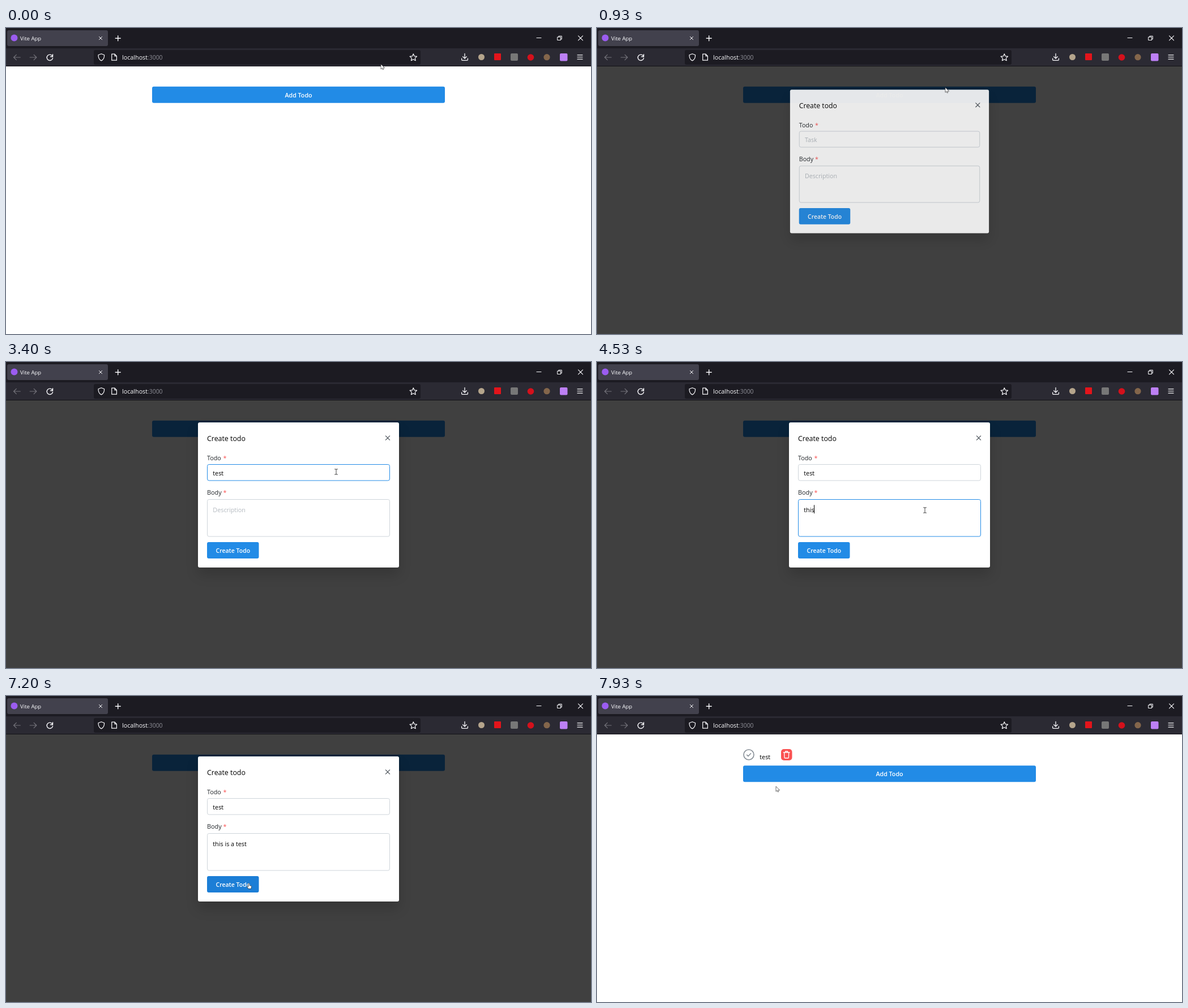
Write an HTML page with a canvas that moves like this. It is 1033x542 px and loops after 8000 ms.

```html
<!DOCTYPE html>
<html lang="en">
<head>
<meta charset="utf-8">
<title>Todo demo</title>
<style>
html, body { margin: 0; width: 100%; height: 100%; overflow: hidden; background: #fff; }
canvas { display: block; }
</style>
</head>
<body>
<canvas id="stage" width="1033" height="542"></canvas>
<script>
const W = 1033, H = 542, LOOP = 8000, STEP = 8000 / 120;
const FONT = '"Open Sans", "Noto Sans", sans-serif';
const BLUE = '#228be6', HOVER = '#1c7ed6', RED = '#fa5252';
const OPEN = 777, CLOSE = 7290, SUBMIT = 7130;
const main = document.getElementById('stage').getContext('2d');
const layer = document.createElement('canvas');
layer.width = W; layer.height = H;
const modalCtx = layer.getContext('2d');
let c = main;

const clamp = x => Math.max(0, Math.min(1, x));
const mix = (a, b, p) => a + (b - a) * p;
const mixColor = (a, b, p) => `rgb(${a.map((v, i) => Math.round(mix(v, b[i], p)))})`;

// CSS "ease": cubic-bezier(.25, .1, .25, 1)
function ease(x) {
  x = clamp(x);
  const bez = (a, b, s) => 3 * a * s * (1 - s) ** 2 + 3 * b * s * s * (1 - s) + s ** 3;
  let lo = 0, hi = 1;
  for (let i = 0; i < 20; i++) {
    const mid = (lo + hi) / 2;
    if (bez(.25, .25, mid) < x) lo = mid; else hi = mid;
  }
  return bez(.1, 1, lo);
}

function rect(x, y, w, h, fill, r = 0, stroke) {
  c.beginPath();
  c.roundRect(x, y, w, h, r);
  if (fill) { c.fillStyle = fill; c.fill(); }
  if (stroke) { c.strokeStyle = stroke; c.lineWidth = 1; c.stroke(); }
}

function dot(x, y, r, fill) {
  c.beginPath();
  c.arc(x, y, r, 0, 7);
  c.fillStyle = fill;
  c.fill();
}

function line(d, color, width = 1.2, x = 0, y = 0, fill) {
  c.save();
  c.translate(x, y);
  c.lineCap = c.lineJoin = 'round';
  const path = new Path2D(d);
  if (fill) { c.fillStyle = fill; c.fill(path); }
  c.strokeStyle = color;
  c.lineWidth = width;
  c.stroke(path);
  c.restore();
}

function text(str, x, y, size, color, weight = 400, align = 'left') {
  c.font = `${weight} ${size}px ${FONT}`;
  c.textAlign = align;
  c.fillStyle = color;
  c.fillText(str, x, y);
}

function cross(x, y, r, color, width) {
  line(`M${-r} ${-r}L${r} ${r}M${r} ${-r}L${-r} ${r}`, color, width, x, y);
}

function drawBrowser() {
  const ink = '#fbfbfe', dim = '#74737b';
  rect(0, 0, W, 36, '#1c1b22');
  rect(0, 36, W, 32, '#2b2a33');
  rect(0, 67, W, 1, '#121116');
  rect(2, 4, 178, 28, '#42414d', 3);
  dot(14.5, 17.5, 6, '#9b5cf0');
  text('Vite App', 25, 21.7, 9.6, ink);
  cross(167, 18, 2.6, ink, 1);
  line('M-4.5 0H4.5M0-4.5V4.5', ink, 1.4, 197.7, 18.3);
  line('M937 17.5H945', ink, 1);
  line('M974 16h5.5v5.5h-5.5zM975.8 16v-1.7h5.5v5.5h-1.7', ink, 1);
  cross(1014.5, 17.8, 4, ink, 1.1);

  line('M6 0H-5.5M-1-4.7L-5.7 0L-1 4.7', dim, 1.2, 19.3, 52);
  line('M-6 0H5.5M1-4.7L5.7 0L1 4.7', dim, 1.2, 48.2, 52);
  line('M4.6-2.6A5.2 5.2 0 1 0 5.2 1M5.2-5.5V-1.6H1.3', ink, 1.4, 77.3, 52.3);

  rect(155, 39, 577, 26, '#1c1b22', 3);
  line('M0-6L5.3-4C5.5 1 3.5 4.4 0 6.2C-3.5 4.4-5.5 1-5.3-4Z', ink, 1.2, 168.3, 51.7);
  line('M-4.3-5.5H1L4.4-2V5.5H-4.3ZM1-5.5V-2H4.4', ink, 1.2, 191, 51.7);
  text('localhost', 205, 56, 10.75, ink);
  text(':3000', 250, 56, 10.4, '#8f8f98');
  let star = 'M';
  for (let i = 0; i < 10; i++) {
    const a = i * Math.PI / 5, r = i % 2 ? 3.1 : 6.6;
    star += `${i ? 'L' : ''}${(r * Math.sin(a)).toFixed(2)} ${(-r * Math.cos(a)).toFixed(2)}`;
  }
  line(star + 'Z', ink, 1.2, 719.3, 52.4);

  line('M0-6V2.5M-3.3-.7L0 2.6L3.3-.7M-5.4 2.5V4.4Q-5.4 5.8-4 5.8H4Q5.4 5.8 5.4 4.4V2.5', ink, 1.3, 810, 51.5);
  dot(839.5, 51.5, 5.5, '#b5a58c');
  rect(862, 45, 12, 12, '#e3141b', 1);
  rect(891, 45, 13, 13, '#777', 2);
  dot(926.5, 52, 5.8, '#d4111c');
  dot(955, 51.7, 5.6, '#84664b');
  rect(978, 45, 13.5, 13.5, '#bd80f5', 2);
  line('M1009 47.8H1018M1009 51.5H1018M1009 55.2H1018', ink, 1.2);
}

function drawPage(t, hovered) {
  const added = t >= CLOSE;
  rect(0, 68, W, H - 68, '#fff');
  if (added) {
    c.beginPath();
    c.arc(268, 104, 9, 0, 7);
    c.strokeStyle = '#868e96';
    c.lineWidth = 1.6;
    c.stroke();
    line('M-3.4.2L-1 2.6L3.6-2.2', '#868e96', 1.5, 268, 104);
    text('test', 287.3, 112, 10.8, '#000');
    rect(325, 94, 19.5, 20, RED, 5);
    line('M-5.5-4H5.5M-2-4V-6H2V-4M-4-4L-3.7 5Q-3.6 6-2.6 6H2.6Q3.6 6 3.7 5L4-4', '#fff', 1.3, 334.7, 104);
  }
  const y = added ? 123.2 : 103.8 + (t >= 670 && t < 730 ? .8 : 0);
  rect(258, y, 517, 29, hovered ? HOVER : BLUE, 3);
  text('Add Todo', 516.5, y + 19.2, 10.7, '#fff', 600, 'center');
}

const TASK = 'test', TASK_KEYS = [2470, 2530, 2670, 2730];
const BODY = 'this is a test';
const BODY_KEYS = [4270, 4330, 4470, 4530, 4670, 4730, 4800, 4930, 5000, 5070, 5330, 5470, 5670, 5730];
const typed = (str, keys, t) => str.slice(0, keys.filter(k => k <= t).length);

// Focus strength of a field whose border colour takes about 100 ms to change
function focus(t, from, to) {
  return ease((t - from + 40) / 100) * (1 - ease((t - to + 40) / 100));
}

function drawField(y, h, base, value, hint, strength, caret) {
  const border = mixColor([206, 212, 218], [34, 139, 230], strength);
  rect(355.5, y + .5, 322, h - 1, '#fff', 3, border);
  text(value || hint, 365.3, base, 10.8, value ? '#000' : '#b4bac0');
  if (caret) {
    const x = 365 + Math.round(value ? c.measureText(value).width : 0);
    rect(x, base - 12.5, 1, 15, '#000');
  }
}

function drawLabel(str, y) {
  text(str, 355, y, 10.8, '#212529');
  text('*', 383.5, y, 10.8, RED);
}

function drawModal(t, p, hovered) {
  c = modalCtx;
  c.clearRect(0, 0, W, H);
  c.save();
  const scale = mix(.9, 1, p);
  c.translate(516.5, 235.5);
  c.scale(scale, scale);
  c.translate(-516.5, -235.5 + 8 * (1 - p));

  c.save();
  c.shadowColor = 'rgba(0,0,0,.16)';
  c.shadowBlur = 22;
  c.shadowOffsetY = 13;
  rect(339, 107, 355, 257, '#fff', 3);
  c.restore();

  text('Create todo', 355, 139.7, 12.4, '#000');
  cross(674, 134.5, 3.6, '#495057', 1.2);
  drawLabel('Todo', 174);
  drawLabel('Body', 235);
  const taskCaret = t >= 2200 && t < 3930 && !(t >= 3270 && t < 3800);
  const bodyCaret = t >= 3930 && t < SUBMIT && !(t >= 6070 && t < 6570);
  drawField(181, 29.5, 200.5, typed(TASK, TASK_KEYS, t), 'Task', focus(t, 2200, 3930), taskCaret);
  drawField(243, 66.5, 265.7, typed(BODY, BODY_KEYS, t), 'Description', focus(t, 3930, SUBMIT), bodyCaret);
  const y = 319 + (t === SUBMIT ? .8 : 0);
  rect(355, y, 91.5, 29, hovered ? HOVER : BLUE, 3);
  text('Create Todo', 400.8, y + 19.2, 10.5, '#fff', 600, 'center');
  c.restore();

  c = main;
  c.globalAlpha = p;
  c.drawImage(layer, 0, 0);
  c.globalAlpha = 1;
}

// Each move: start, end, target x, target y
const MOVES = [
  [30, 470, 615, 105.5],
  [1490, 1930, 583, 194.5],
  [3440, 3870, 579, 262.5],
  [6410, 6930, 428.7, 331.5],
  [7400, 7930, 316, 160.5]
];

function pointer(t) {
  let x = 662, y = 64.3;
  for (const [from, to, tx, ty] of MOVES) {
    const u = clamp((t - from) / (to - from)), p = u * u * (3 - 2 * u);
    x = mix(x, tx, p);
    y = mix(y, ty, p);
  }
  return [x, y];
}

const inside = (x, y, l, t, r, b) => x >= l && x <= r && y >= t && y <= b;

function drawPointer(kind, x, y) {
  if (kind === 'text') {
    line('M-2.5-4.7H-.6Q0-4.7 0-4Q0-4.7.6-4.7H2.5M0-4V4M-2.5 4.7H-.6Q0 4.7 0 4Q0 4.7.6 4.7H2.5', '#333', .9, x, y);
  } else if (kind === 'hand') {
    line('M-1 .8Q0-.6 1 .8V4L4.2 4.8Q5 5.2 4.8 6.2L4 10H-.4L-3 6.6Q-3.3 5.3-2 5.5L-1 6.4Z', '#222', .7, x, y, '#fff');
  } else {
    line('M0 0V8.6L2-0.1L2 6.9L3.4 9.6L4.7 9L3.5 6.4H6.3Z'.replace('L2-0.1', ''), '#333', .7, x, y, '#fff');
  }
}

function render(t) {
  const opened = t >= OPEN && t < CLOSE;
  const [x, y] = pointer(t);
  const addTop = t >= CLOSE ? 123 : 104;
  const onAdd = !opened && inside(x, y, 258, addTop, 775, addTop + 29);
  const onCreate = opened && inside(x, y, 355, 319, 446, 348);
  const onField = opened && (inside(x, y, 355, 181, 678, 210) || inside(x, y, 355, 243, 678, 309));

  drawBrowser();
  drawPage(t, onAdd);
  const shade = ease((t - OPEN) / 150) * (1 - ease((t - CLOSE) / 150));
  const pop = ease((t - OPEN) / 250) * (1 - ease((t - CLOSE) / 250));
  if (shade > 0) rect(0, 68, W, H - 68, `rgba(0,0,0,${.75 * shade})`);
  if (pop > 0) drawModal(t, pop, onCreate);
  drawPointer(onField ? 'text' : onAdd || onCreate ? 'hand' : 'arrow', x, y);
}

function tick() {
  const tickIndex = Math.floor((performance.now() % LOOP) / STEP + .1) % 120;
  render(Math.round(tickIndex * STEP / 10) * 10);
  requestAnimationFrame(tick);
}
tick();
</script>
</body>
</html>
```
